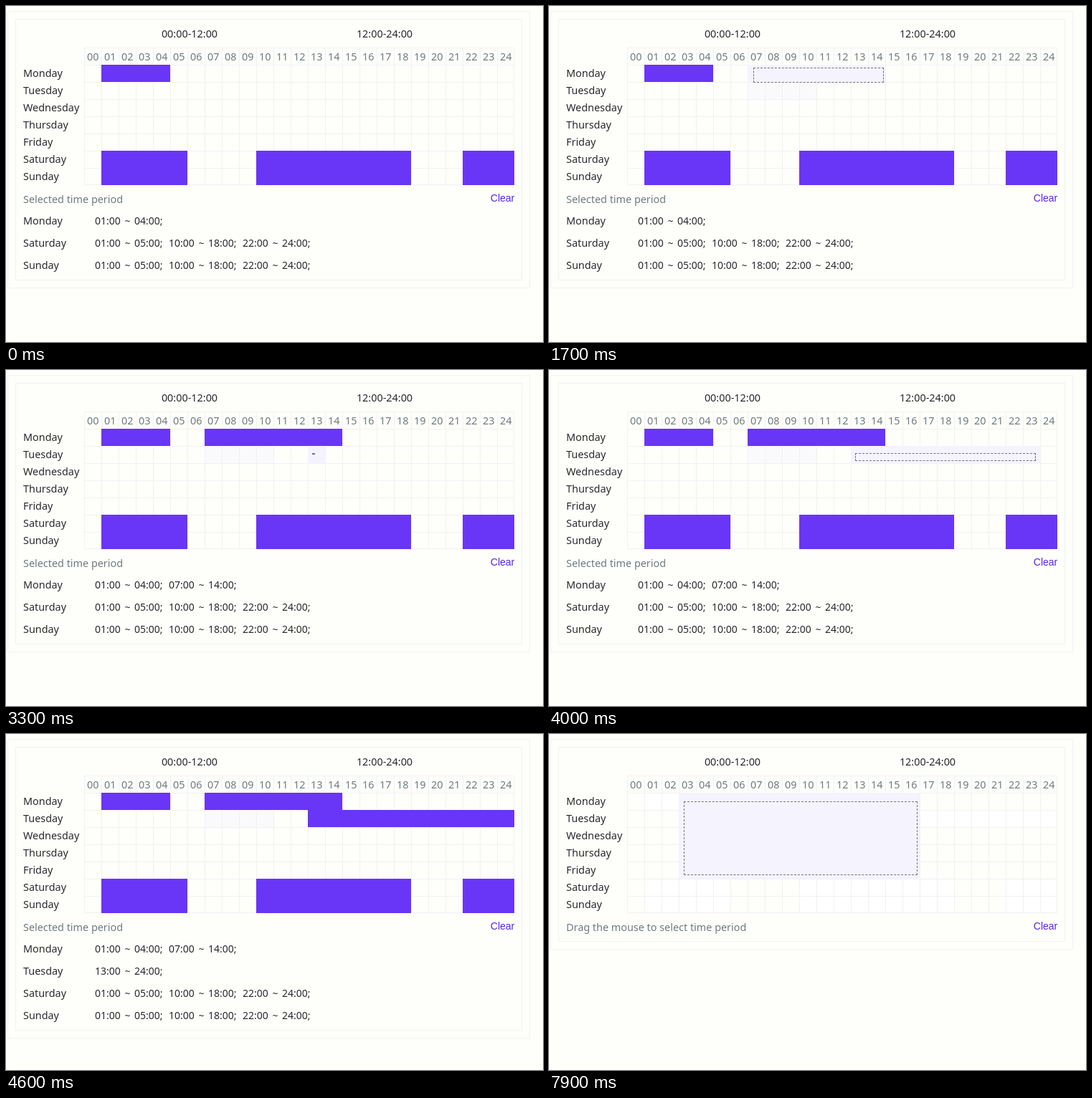
Recreate the animation shown at these times as an HTML page. Size 749x469 px, loop 8000 ms.

```html
<!DOCTYPE html>
<html lang="en">
<head>
<meta charset="utf-8">
<title>Weekly time picker</title>
<style>
  html, body { margin: 0; width: 100%; height: 100%; overflow: hidden; background: #fefffa; }
  svg { position: absolute; left: 0; top: 0; display: block; }
  text { font: 14.4px "Noto Sans", "Open Sans", sans-serif; fill: #29292e; }
  .soft { fill: #6f7a7e; }
  .mid { text-anchor: middle; }
  .span { font-size: 14px; word-spacing: 2px; }
  .clear { font: 14px "Liberation Sans", Arial, sans-serif; fill: #5722ea; text-anchor: end; }
  .panel { fill: none; stroke: #f0f1f6; }
  .line { fill: #f0f1f6; }
  .on { fill: #6935f6; }
  .was { fill: #fff; }
  .ghost { fill: #fafafc; }
  .tint { fill: #f5f3fe; }
  #marker { position: absolute; box-sizing: border-box; border: 1px dashed #75727e; }
</style>
</head>
<body>
<svg width="749" height="469" viewBox="0 0 749 469">
  <rect class="panel" id="outer" x="2.5" y="7.5" width="728"/>
  <rect class="panel" id="inner" x="13.5" y="18.5" width="706"/>
  <g id="under"></g>
  <g id="grid"></g>
  <g id="over"></g>
  <g id="labels"></g>
  <g id="list"></g>
</svg>
<div id="marker"></div>
<script>
const LOOP = 8000, STEP = 100, CLEARED = 6700;
const LEFT = 109, TOP = 82, CELL = 24, COLS = 25;
const DAYS = ["Monday", "Tuesday", "Wednesday", "Thursday", "Friday", "Saturday", "Sunday"];

// day, first hour, last hour, time of appearance
const PERIODS = [
  [0, 1, 4, 0], [0, 7, 14, 2000], [1, 13, 24, 4600],
  [5, 1, 5, 0], [5, 10, 18, 0], [5, 22, 24, 0],
  [6, 1, 5, 0], [6, 10, 18, 0], [6, 22, 24, 0]
];

const bump = u => Math.sin(Math.PI * u);
const smooth = u => u * u * (3 - 2 * u);
const clamp = u => Math.max(0, Math.min(1, u));

// size(t) gives the width and height since the drag began
const DRAGS = [
  { from: 1000, to: 2000, x: 285, y: 86, size(t) {
      const e = smooth(clamp(t / 700));
      return [5 + 177 * e, 2 + 19 * (1 - (1 - e) ** 4) + 3.5 * bump(e)];
    } },
  { from: 3300, to: 4600, x: 427, y: 116, size(t) {
      const u = clamp(t / 800);
      return [4 + 255 * (1 - (1 - u) ** 1.72) + 13 * clamp((t - 800) / 300),
              2 + 9 * u + 4 * bump(u)];
    } },
  { from: 7500, to: LOOP, x: 188, y: 94, size(t) {
      const e = smooth(clamp(t / 400));
      return [6 + 320 * e, 4 + 99 * e];
    } }
];

const $ = id => document.getElementById(id);
const pad = n => String(n).padStart(2, "0");
const rect = (cls, x, y, w, h) =>
  `<rect class="${cls}" x="${x}" y="${y}" width="${w}" height="${h}"/>`;
const text = (cls, x, y, s) => `<text class="${cls}" x="${x}" y="${y}">${s}</text>`;
const cells = (cls, r0, r1, c0, c1) =>
  rect(cls, LEFT + c0 * CELL, TOP + r0 * CELL, (c1 - c0 + 1) * CELL, (r1 - r0 + 1) * CELL);
const col = x => Math.floor((x - LEFT) / CELL);
const row = y => Math.floor((y - TOP) / CELL);

function buildStatic() {
  let grid = "";
  let labels = text("mid", 256, 44, "00:00-12:00") + text("mid", 528, 44, "12:00-24:00") +
    text("clear", 709.3, 273, "Clear");
  for (let c = 0; c <= COLS; c++) {
    grid += rect("line", Math.min(LEFT + c * CELL, 708), 58, 1, 192);
    if (c < COLS) labels += text("soft mid", LEFT + 12.2 + c * CELL, 76, pad(c));
  }
  for (let r = 0; r <= 8; r++) grid += rect("line", LEFT, Math.min(58 + r * CELL, 249), 600, 1);
  DAYS.forEach((d, r) => labels += text("", 24, 99 + r * CELL, d));
  $("grid").innerHTML = grid;
  $("labels").innerHTML = labels;
}

// Draws the dashed marker and returns the cells it touches
function drawDrag(t) {
  const drag = DRAGS.find(d => t >= d.from && t < d.to);
  const style = $("marker").style;
  style.display = drag ? "block" : "none";
  if (!drag) return "";
  const [w, h] = drag.size(t - drag.from).map(Math.round);
  style.left = drag.x + "px";
  style.top = drag.y + "px";
  style.width = w + "px";
  style.height = h + "px";
  return cells("tint", row(drag.y), row(drag.y + h - 5), col(drag.x), col(drag.x + w - 1));
}

function drawList(active, cleared) {
  const days = [...new Set(active.map(p => p[0]))];
  let list = text("soft", 24, 275, cleared ? "Drag the mouse to select time period" : "Selected time period");
  days.forEach((d, i) => {
    const y = 305 + i * 31;
    list += text("", 24, y, DAYS[d]);
    active.filter(p => p[0] === d).forEach(([, a, b], k) =>
      list += text("span", 124 + k * 103, y, `${pad(a)}:00 ~ ${pad(b)}:00;`));
  });
  $("list").innerHTML = list;
  $("outer").setAttribute("height", 293 + 31 * days.length);
  $("inner").setAttribute("height", 271 + 31 * days.length);
}

function draw(t) {
  const cleared = t >= CLEARED;
  const active = cleared ? [] : PERIODS.filter(p => t >= p[3]);
  let under = cleared ? PERIODS.map(([d, a, b]) => cells("was", d, d, a, b)).join("") : "";
  // trace left where the first drag brushed Tuesday
  if (t >= 1300) under += cells("ghost", 1, 1, 7, 10);
  $("under").innerHTML = under;
  $("over").innerHTML = active.map(([d, a, b]) => cells("on", d, d, a, b)).join("") + drawDrag(t);
  drawList(active, cleared);
}

buildStatic();
draw(0);
const start = performance.now();
let shown = 0;
function tick() {
  const t = Math.floor((performance.now() - start) % LOOP / STEP) * STEP;
  if (t !== shown) draw(shown = t);
  requestAnimationFrame(tick);
}
requestAnimationFrame(tick);
</script>
</body>
</html>
```
